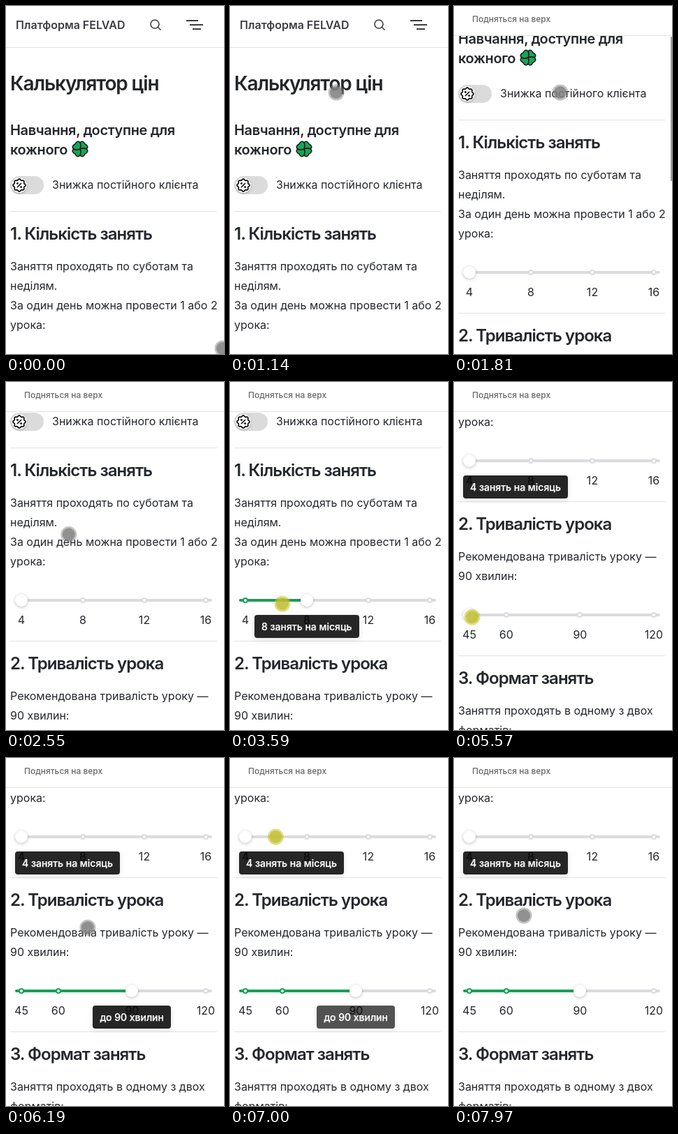
Write an HTML page that moves like this. It is 312x499 px and loops after 7.99 s.

```html
<!DOCTYPE html>
<html lang="uk">
<head>
<meta charset="utf-8">
<title>Калькулятор цін</title>
<style>
  html, body { margin: 0; width: 100%; height: 100%; overflow: hidden; background: #fff; }
  body { position: relative; font: 400 16px/28px Inter, sans-serif; color: #24272c; white-space: nowrap; }
  body > *, nav svg, h3 svg, .slider * { position: absolute; }
  nav { position: relative; height: 59px; padding-left: 14px; border-bottom: 1px solid #e2e2e3;
        font-weight: 600; line-height: 54px; color: #3c3c43; }
  nav svg { left: 0; top: 0; fill: none; stroke: #3c3c43; }
  #page { width: 312px; }
  main { padding: 0 10px 0 6px; }
  h1, h2, h3, p { margin: 0; font-weight: 600; }
  h1 { margin-top: 31px; font-size: 28px; line-height: 40px; letter-spacing: -.041em; }
  h2 { margin-bottom: 16px; border-top: 1px solid #e2e2e3; padding-top: 16px;
       font-size: 24px; line-height: 32px; letter-spacing: -.04em; }
  h3 { position: relative; margin: 33px 0 24px; font-size: 20px; letter-spacing: -.018em; }
  h3 svg { left: 88px; top: 29px; }
  p { font-weight: 400; }
  .switch { display: flex; height: 26px; margin-bottom: 24px; line-height: 24px; }
  .switch i { width: 48px; height: 26px; margin-right: 12px; border-radius: 13px; background: #dbdbdb; }
  .switch svg { display: block; margin: 2px; border-radius: 50%; background: #fff; box-shadow: 0 1px 3px #0004; }
  .slider { position: relative; height: 100px; margin-left: -6px; }
  .rail, .fill { left: 13px; top: 40px; width: 282px; height: 4px; border-radius: 2px; background: #dbdbdf; }
  .fill { background: #18a058; }
  .dot { top: 38px; width: 4px; height: 4px; margin-left: -4px; border: 2px solid #dbdbdf; border-radius: 50%; background: #fff; }
  .dot.on { border-color: #18a058; }
  .knob { top: 33px; width: 18px; height: 18px; margin-left: -9px; border-radius: 50%; background: #fff; box-shadow: 0 1px 4px #0004; }
  .label { top: 56px; transform: translateX(-50%); }
  .tip { top: 63px; padding: 0 10px; border-radius: 4px; background: rgba(0,0,0,.85); color: #fff;
         font-size: 14px; font-weight: 500; line-height: 33px; -webkit-text-stroke: .25px #fff;
         box-shadow: 0 2px 8px rgba(0,0,0,.12); }
  #bar { width: 286px; height: 42px; padding-left: 26px; background: #fff; border-bottom: 1px solid #e2e2e3;
         font-size: 12px; font-weight: 500; line-height: 37px; color: #67676c; }
  #thumb { right: 0; width: 2px; height: 207px; background: #a0a0a0; }
  #cursor { width: 18px; height: 18px; margin: -9px; border-radius: 50%; opacity: .87;
            background: #808080; box-shadow: 0 0 0 2.5px #8088; }
  #cursor { box-shadow: 0 0 0 2.5px rgba(128,128,128,.55); }
  #cursor.down { background: #bfbe30; box-shadow: 0 0 0 2.5px rgba(200,198,40,.65); }
</style>
</head>
<body>
<div id="page">
  <nav>Платформа FELVAD
    <svg width="312" height="59">
      <path stroke-width="1.6" d="M219 26a6 6 0 1 0-12 0a6 6 0 1 0 12 0M217.5 30.5l4 4"/>
      <path stroke-width="2" d="M258 21h17M263 27h19M267 33h12"/>
    </svg>
  </nav>
  <main>
    <h1>Калькулятор цін</h1>
    <h3>Навчання, доступне для<br>кожного <svg id="clover" width="24" height="24" viewBox="-12 -12 24 24"></svg></h3>
    <div class="switch"><i><svg id="badge" width="22" height="22" viewBox="-11 -11 22 22"></svg></i>Знижка постійного клієнта</div>
    <h2>1. Кількість занять</h2>
    <p>Заняття проходять по суботам та<br>неділям.<br>За один день можна провести 1 або 2<br>урока:</p>
    <div class="slider" id="count"></div>
    <h2>2. Тривалість урока</h2>
    <p>Рекомендована тривалість уроку —<br>90 хвилин:</p>
    <div class="slider" id="length"></div>
    <h2>3. Формат занять</h2>
    <p>Заняття проходять в одному з двох<br>форматів:</p>
  </main>
</div>
<div id="bar">Подняться на верх</div>
<div id="thumb"></div>
<div id="cursor"></div>
<script>
const LOOP = 7990, FADE = 200, WHEEL = 206;
const $ = id => document.getElementById(id);
const ramp = (t, start, span) => Math.max(0, Math.min(1, (t - start) / span));

$('clover').innerHTML = [45, 135, 225, 315].map(a =>
  `<path transform="rotate(${a})" d="M0 0C-9 -4 -8 -13 0 -10C8 -13 9 -4 0 0Z" fill="#1da35a" stroke="#12251a" stroke-width="1.6"/>`).join('');

// Wavy outline around a percent sign
const wave = Array.from({ length: 96 }, (_, i) => {
  const a = i * Math.PI / 48, r = 8.2 + .8 * Math.cos(8 * a);
  return [r * Math.cos(a), r * Math.sin(a)].map(v => v.toFixed(2));
});
$('badge').innerHTML = `<path d="M${wave.join('L')}Z" fill="none" stroke="#111" stroke-width="1.8"/>
  <path d="M-3 3L3 -3" stroke="#111" stroke-width="1.7"/>
  <circle cx="-2.6" cy="-2.6" r="1.4"/><circle cx="2.6" cy="2.6" r="1.4"/>`;

// Pointer moves: start, end, x, y
const moves = [
  [0, 660, 190, 202], [800, 1140, 152, 124], [2260, 2850, 25, 317],
  [3130, 3600, 75, 318], [3950, 4130, 40, 317], [4150, 4390, 77, 276],
  [5020, 5480, 26, 337], [5600, 6000, 132, 337], [6020, 6360, 102, 151],
  [6410, 6750, 36, 113], [6900, 7065, 80, 113], [7490, 7590, 37, 111],
  [7790, 7970, 100, 226]
];
const wheel = [1410, 1770, 4420, 4790];

function pointer(t) {
  let x = 310, y = 491;
  for (const [start, end, toX, toY] of moves) {
    const k = ramp(t, start, end - start), e = k * k * (3 - 2 * k);
    x += (toX - x) * e;
    y += (toY - y) * e;
  }
  return [x, y];
}

function slider(id, values, caption, drags, shown, hidden = Infinity) {
  const root = $(id), min = values[0], max = values[values.length - 1];
  const place = v => 22 + 264 * (v - min) / (max - min);
  const add = (cls, x, html = '') => {
    const el = document.createElement('div');
    el.className = cls;
    el.innerHTML = html;
    if (x) el.style.left = x + 'px';
    return root.appendChild(el);
  };
  add('rail');
  const fill = add('fill');
  const dots = values.map(v => add('dot', place(v)));
  const knob = add('knob');
  values.forEach(v => add('label', place(v), v));
  const tip = add('tip');

  const valueAt = t => {
    const drag = drags.filter(([start]) => start <= t).pop();
    if (!drag) return min;
    const [x] = pointer(Math.min(t, drag[1]));
    return values.reduce((a, b) => Math.abs(place(b) - x) < Math.abs(place(a) - x) ? b : a);
  };

  return {
    held: t => drags.some(([start, end]) => t >= start && t < end),
    draw(t) {
      const value = valueAt(t), x = place(value);
      fill.style.width = (value > min ? x - 13 : 0) + 'px';
      knob.style.left = x + 'px';
      dots.forEach((d, i) => d.classList.toggle('on', value > min && values[i] <= value));
      tip.textContent = caption(value);
      tip.style.left = Math.max(13, x - tip.offsetWidth / 2) + 'px';
      tip.style.opacity = ramp(t, shown, FADE) - ramp(t, hidden, FADE);
    }
  };
}

const sliders = [
  slider('count', [4, 8, 12, 16], v => `${v} занять на місяць`, [[3090, 4150], [6900, 7590]], 2850),
  slider('length', [45, 60, 90, 120], v => `до ${v} хвилин`, [[5550, 6020]], 5580, 6960)
];

function draw(t) {
  let scroll = 0, glow = 0;
  for (const start of wheel) {
    scroll += 100 * Math.sin(ramp(t, start, WHEEL) * Math.PI / 2);
    if (t > start) glow = 1 - ramp(t, start + 500, FADE);
  }
  scroll = Math.round(scroll);
  $('page').style.transform = `translateY(${-scroll}px)`;
  $('bar').hidden = scroll < 60;
  $('thumb').style.top = scroll * .36 - 3 + 'px';
  $('thumb').style.opacity = glow;

  sliders.forEach(s => s.draw(t));
  const [x, y] = pointer(t);
  $('cursor').style.transform = `translate(${x}px, ${y}px)`;
  $('cursor').className = sliders.some(s => s.held(t)) ? 'down' : '';
}

const start = performance.now();
(function frame() {
  draw((performance.now() - start) % LOOP);
  requestAnimationFrame(frame);
})();
</script>
</body>
</html>
```
